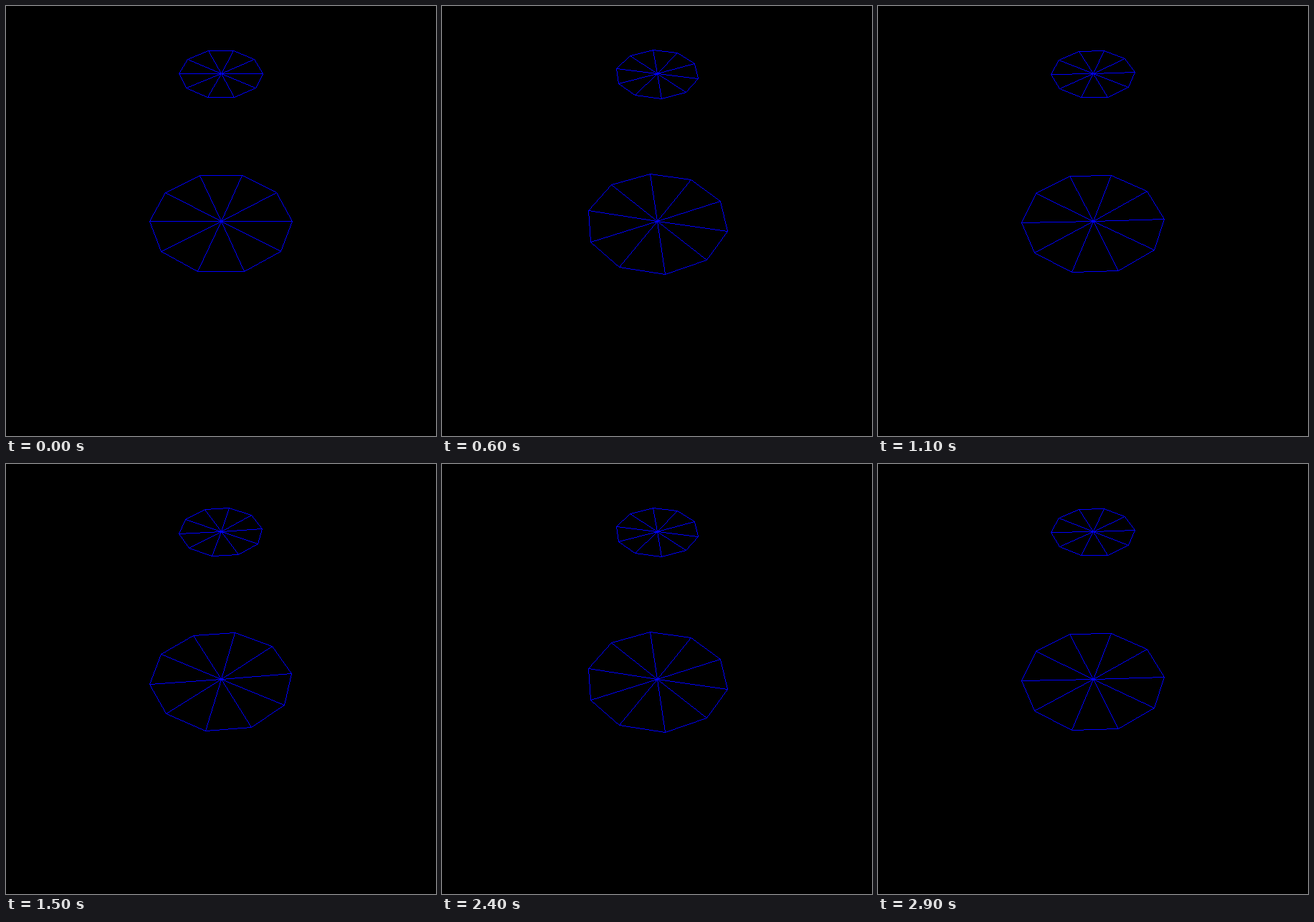
Animation, 600 px wide and 600 px high, one loop 3000 ms. Source, as an HTML page with a canvas:

```html
<!DOCTYPE html>
<html>
<head>
<meta charset="utf-8">
<title>Rotating wheels</title>
<style>
html, body { margin: 0; width: 100%; height: 100%; overflow: hidden; background: #000; }
canvas { display: block; }
</style>
</head>
<body>
<canvas id="stage" width="600" height="600"></canvas>
<script>
const ctx = document.getElementById('stage').getContext('2d');
const SIZE = 600, SIDES = 10, STEP_MS = 100, STEPS = 30, STEP_DEG = 10;
const RAD = Math.PI / 180;

// The camera looks down at 45 degrees on the origin.
const FOCAL = 1192, DIST = 12;
const WHEELS = [{ r: 1, h: 0 }, { r: 0.5, h: 2.5 }];

// Returns the whole pixel that holds the projected point.
function project(x, y, z) {
  const scale = FOCAL / (DIST - (y + z) * Math.SQRT1_2);
  const sx = SIZE / 2 + x * scale;
  const sy = SIZE / 2 - (y - z) * Math.SQRT1_2 * scale;
  return [sx, sy].map(v => Math.floor(v + 1e-6));
}

// Bresenham line, one pixel wide, without smoothing.
function line([x, y], [x1, y1]) {
  const dx = Math.abs(x1 - x), dy = Math.abs(y1 - y);
  const sx = Math.sign(x1 - x), sy = Math.sign(y1 - y);
  const flat = dx > dy;
  const long = Math.max(dx, dy), short = Math.min(dx, dy);
  let err = 2 * short - long;
  for (let i = 0; i <= long; i++) {
    ctx.fillRect(x, y, 1, 1);
    const side = err >= 0;
    if (flat || side) x += sx;
    if (!flat || side) y += sy;
    if (side) err -= 2 * long;
    err += 2 * short;
  }
}

function drawWheel({ r, h }, turn) {
  const hub = project(0, h, 0);
  const rim = Array.from({ length: SIDES }, (_, i) => {
    const a = turn + i * 2 * Math.PI / SIDES;
    return project(r * Math.cos(a), h, -r * Math.sin(a));
  });
  rim.forEach((p, i) => {
    line(hub, p);
    line(p, rim[(i + 1) % SIDES]);
  });
}

let last = -1;
function tick() {
  const step = Math.floor(performance.now() / STEP_MS) % STEPS;
  if (step !== last) {
    last = step;
    ctx.fillStyle = '#000';
    ctx.fillRect(0, 0, SIZE, SIZE);
    ctx.fillStyle = '#00f';
    WHEELS.forEach(w => drawWheel(w, step * STEP_DEG * RAD));
  }
  requestAnimationFrame(tick);
}
tick();
</script>
</body>
</html>
```
